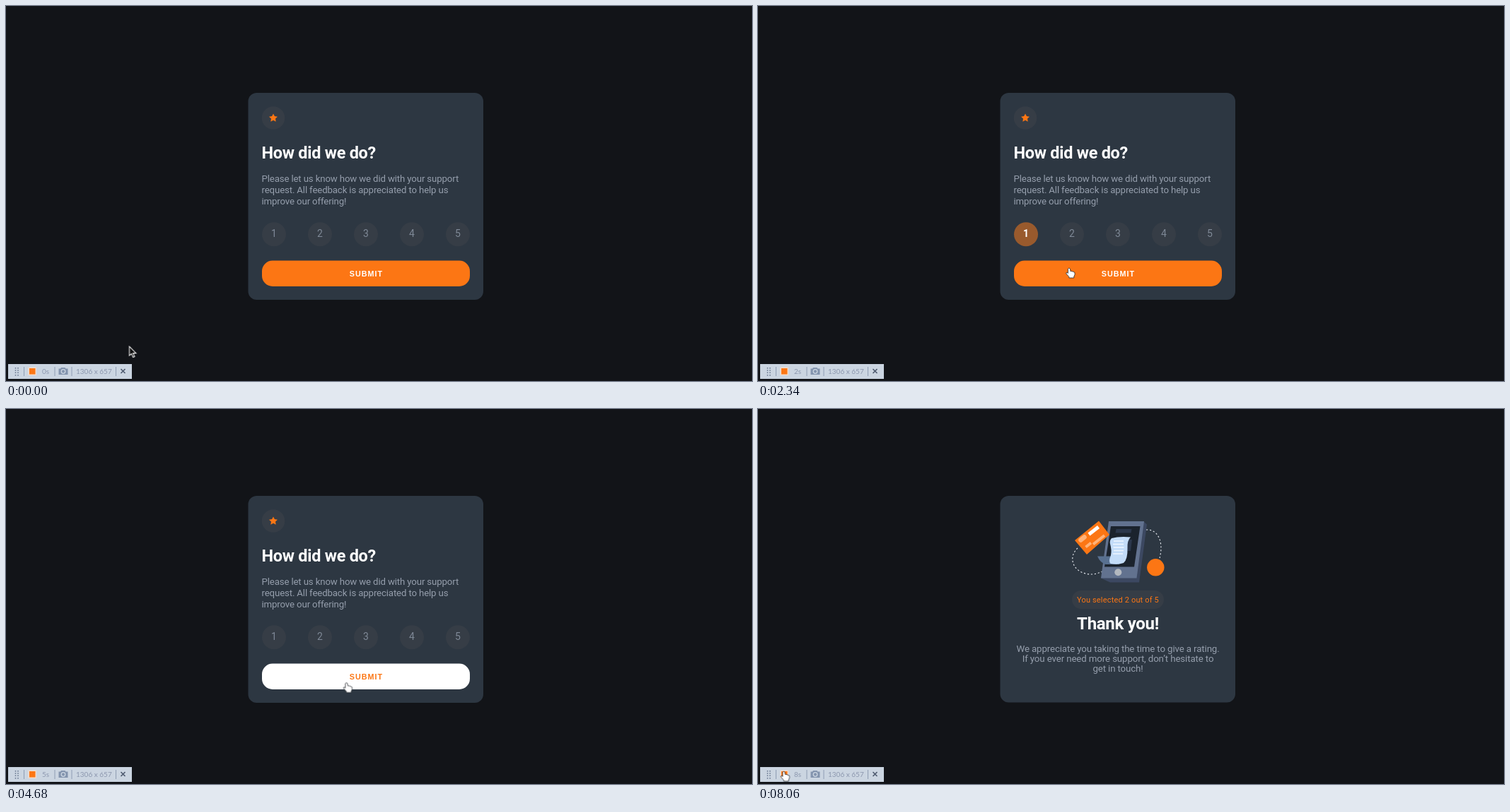
An HTML page that plays this animation: 1055x531 px, repeating every 8.19 s.

```html
<!DOCTYPE html>
<html lang="en">
<head>
<meta charset="utf-8">
<title>Rating card</title>
<style>
  html, body { margin: 0; width: 100%; height: 100%; overflow: hidden; background: #121418; }
  svg { display: block; width: 100%; height: 100%; }
  text { font-family: Roboto, sans-serif; }
  .title { font-size: 23.5px; font-weight: 700; letter-spacing: -.3px; fill: #fff; }
  .body { font-size: 13.3px; letter-spacing: -.17px; fill: #959eac; }
  .mid { text-anchor: middle; }
  .disc { fill: #363d46; }
  .digit { font-size: 14px; fill: #7f8997; }
  .orange { fill: #fc7614; }
  .submit { font: 700 10.8px "Liberation Sans", Arial, sans-serif; letter-spacing: .95px; fill: #fff; }
  .bar text { font: 10px Lato, sans-serif; fill: #8c97ae; }
  .sep { stroke: #8f9db3; }
</style>
</head>
<body>
<svg viewBox="0 0 1055 531">
  <g id="form">
    <rect x="342.5" y="123" width="332.5" height="293" rx="12" fill="#2d3742"/>
    <circle class="disc" cx="378" cy="158.5" r="16.3"/>
    <path id="star" class="orange" d="M378 152.4l1.9 3.7 4.1.6-3 2.9.7 4.2-3.7-2-3.7 2 .7-4.2-3-2.9 4.1-.6z"/>
    <text class="title" x="361.5" y="216">How did we do?</text>
    <g class="body">
      <text x="361.5" y="249">Please let us know how we did with your support</text>
      <text x="361.5" y="265">request. All feedback is appreciated to help us</text>
      <text x="361.5" y="281.2">improve our offering!</text>
    </g>
    <g id="ratings"></g>
    <rect id="button" class="orange" x="362" y="360.5" width="294" height="36.5" rx="15"/>
    <text id="label" class="submit mid" x="509.4" y="382.6">SUBMIT</text>
  </g>

  <g id="thanks" opacity="0">
    <rect x="342.5" y="123" width="332.5" height="292.4" rx="12" fill="#2d3742"/>
    <g fill="none" stroke="#e4e8ee" stroke-width="1.1" stroke-dasharray="2.2 2.8">
      <path d="M549 171C566 170 574 189 568 211"/>
      <path d="M452 197C439 209 444 228 463 233Q475 236 487 230"/>
    </g>
    <path d="M545 159l5 4.5L539 245.500H498L485 239.500z" fill="#3c4861"/>
    <path d="M496 159H546L535.500 239.500H485z" fill="#62728f"/>
    <path d="M499 166H540.500L532 223.500H490z" fill="#1b232d"/>
    <path d="M506.500 170H528.500L527.500 175.500H505.500z" fill="#2b374b"/>
    <path d="M521 184l8 1-2 16h-6z" fill="#2b374b"/>
    <path d="M480 208.500H512L511 220H492Q484 218 480 208.500z" fill="#587090"/>
    <path d="M500 183Q511 180 527 181.500 522 186 522.500 197 523 213 517 218 509 221 499 219 495 217 499 207 500.500 200 498 191 497 186 500 183z" fill="#c3dcf8"/>
    <path d="M503 187h14M502 191.500h15M502.500 196h15M503 200.500h14M502 205h14" stroke="#eff6ff" stroke-width="1.3"/>
    <circle cx="509.300" cy="231.300" r="5" fill="#b3b8bf"/>
    <path class="orange" d="M448 186L482 158.500 497 178 465 206z"/>
    <path d="M468 177.500L481.500 167" stroke="#fff" stroke-width="5"/>
    <g stroke="#ffb278" stroke-width="4">
      <path d="M463.500 195.500l7.500-6M474 191.500l16-12.500"/>
      <path d="M456.500 185.500l5-4" stroke-width="6.500" stroke-linecap="round"/>
    </g>
    <circle class="orange" cx="562.300" cy="224.300" r="12.200"/>
    <rect class="disc" x="444" y="257" width="130" height="26" rx="13"/>
    <text class="orange mid" x="509" y="274.400" font-size="11" letter-spacing=".17">You selected 2 out of 5</text>
    <text class="title mid" x="509" y="312" style="font-size:24px">Thank you!</text>
    <g class="body mid" style="letter-spacing:-.13px">
      <text x="509" y="343.600">We appreciate you taking the time to give a rating.</text>
      <text x="509" y="357.700">If you ever need more support, don’t hesitate to</text>
      <text x="509" y="371.800">get in touch!</text>
    </g>
  </g>

  <g class="bar">
    <rect id="strip" x="3" y="507" width="175" height="21" fill="#cbd5e1"/>
    <path d="M13.500 512v12M17 512v12" stroke="#63718a" stroke-width="1.500" stroke-dasharray="1.500 1.800"/>
    <path class="sep" d="M25.500 511v13"/>
    <rect x="31.500" y="511.500" width="11.500" height="11.500" fill="#f3dccb"/>
    <rect id="stop" class="orange" x="33" y="513" width="8.500" height="8.500"/>
    <text id="seconds" x="51" y="520.500">0s</text>
    <g id="tail">
      <path class="sep" d="M69 511v13M93 511v13M155.500 511v13"/>
      <path d="M74.500 513.500h2.500l1-1.500h5.500l1 1.500h3v8.500h-13z" fill="#8394ae"/>
      <circle cx="81" cy="517.500" r="2.800" fill="none" stroke="#cbd5e1" stroke-width="1.300"/>
      <text x="99" y="520.500">1306 x 657</text>
      <path d="M162.500 514l6 6m0-6l-6 6" stroke="#4d596e" stroke-width="1.600"/>
    </g>
  </g>

  <g id="cursor">
    <path id="arrow" d="M0 0V13L3 10.400 5.200 15.400 7.400 14.400 5.200 9.600H9.400z" fill="#111" stroke="#f2f2f2" stroke-width="1.100"/>
    <path id="hand" d="M-1.600 1.200Q0-1 1.400 1L2 4.600 3.400 4.400 4.600 5 6 5 6.600 5.800Q8.200 5.600 8 7.500V9.500L6.800 12V14H-.2V12.400L-4.200 8Q-4.600 6-2.600 6.600L-1.600 7.500z" fill="#fff" stroke="#23262b" stroke-width=".8"/>
  </g>
</svg>
<script>
const LOOP = 8190, STEP = 130;
const ORANGE = '#fc7614', GREY = '#363d46', DIGIT = '#7f8997', WHITE = '#ffffff';
const $ = id => document.getElementById(id);
const tracks = [];

// keys: alternating time in ms and value; the last value holds to the end
function track(el, prop, keys, easing = 'linear') {
  const frames = [];
  for (let i = 0; i < keys.length; i += 2)
    frames.push({ offset: keys[i] / LOOP, [prop]: keys[i + 1], easing });
  frames.push({ offset: 1, [prop]: keys[keys.length - 1] });
  const anim = el.animate(frames, { duration: LOOP, fill: 'both' });
  anim.pause();
  tracks.push(anim);
}
const jump = (el, prop, ...keys) => track(el, prop, keys, 'step-end');
const fade = (el, ...keys) => track(el, 'fill', keys);

const ratings = [1, 2, 3, 4, 5].map(n => {
  const x = 379 + (n - 1) * 65;
  $('ratings').insertAdjacentHTML('beforeend',
    `<g><circle class="disc" cx="${x}" cy="323.200" r="17"/><text class="digit mid" x="${x}" y="327.300">${n}</text></g>`);
  return $('ratings').lastChild.children;
});

function highlight([disc, digit], ...spans) {
  const fills = [0, GREY], colours = [0, DIGIT], weights = [0, 400];
  for (const [from, full, leave, end] of spans) {
    fills.push(from, GREY, full, ORANGE, leave, ORANGE, end, GREY);
    colours.push(from + STEP, WHITE, end, DIGIT);
    weights.push(from + STEP, 700, end, 400);
  }
  fade(disc, ...fills);
  jump(digit, 'fill', ...colours);
  jump(digit, 'fontWeight', ...weights);
}
highlight(ratings[0], [260, 520, 780, 1040], [1820, 2080, 2210, 2470]);
highlight(ratings[1], [2990, 3250, 3770, 4110]);

fade($('button'), 0, ORANGE, 780, ORANGE, 1170, WHITE, 1690, WHITE, 1820, '#fde6d4', 2210, ORANGE,
  2340, ORANGE, 2730, '#fff4ec', 2860, '#fff4ec', 2990, '#fdd6ba', 3250, ORANGE,
  3770, ORANGE, 3900, '#ff954d', 4160, WHITE);
fade($('label'), 0, WHITE, 780, WHITE, 1170, ORANGE, 1690, ORANGE, 1820, '#a9714a', 2210, WHITE,
  2340, WHITE, 2730, ORANGE, 2860, ORANGE, 2990, '#fb9d59', 3250, WHITE,
  3770, WHITE, 3900, '#d9c6b8', 4160, ORANGE);
fade($('star'), 0, ORANGE, 1690, ORANGE, 1820, '#c07c4c', 1950, ORANGE,
  2860, ORANGE, 2990, '#fca165', 3120, ORANGE);
jump($('stop'), 'fill', 0, ORANGE, 1170, '#000', 2080, ORANGE, 2730, '#000', 3120, ORANGE,
  4160, '#000', 4680, ORANGE);
jump($('form'), 'opacity', 0, 1, 5200, 0);
jump($('thanks'), 'opacity', 0, 0, 5200, 1);

const path = [
  [0, 174.500, 482], [130, 215, 450], [390, 372, 330], [520, 379, 326], [780, 433.500, 363.500],
  [910, 468, 380], [1560, 466, 379], [1820, 393, 332], [1950, 381, 325], [2080, 385, 328],
  [2340, 440, 371], [2600, 472, 378], [2730, 472, 372], [2990, 452.500, 335.500], [3120, 445, 326],
  [3640, 452, 340], [3900, 481.500, 387.500], [6630, 481.500, 387.500], [6890, 430, 405],
  [7150, 300, 445], [7410, 150, 487], [7540, 70, 507], [7670, 42, 514], [8060, 36.500, 513]
];
path.splice(6, 0, [1430, 468, 380]);
path.splice(16, 0, [3510, 445, 326]);
track($('cursor'), 'transform', path.flatMap(([t, x, y]) => [t, `translate(${x}px, ${y}px)`]));

const handShown = [0, 0, 390, 1, 1820, 0, 1950, 1, 2990, 0, 3120, 1, 6760, 0, 7800, 1];
jump($('hand'), 'opacity', ...handShown);
jump($('arrow'), 'opacity', ...handShown.map((v, i) => i % 2 ? 1 - v : v));

function draw(now) {
  const t = Math.floor(now % LOOP / STEP) * STEP;
  for (const anim of tracks) anim.currentTime = t;
  const seconds = Math.floor((t + 520) / 1040), narrow = seconds === 1;
  $('seconds').textContent = seconds + 's';
  $('strip').setAttribute('width', narrow ? 172 : 175);
  $('tail').setAttribute('transform', `translate(${narrow ? -2.300 : 0})`);
}

const start = performance.now();
function tick() {
  draw(performance.now() - start);
  requestAnimationFrame(tick);
}
tick();
</script>
</body>
</html>
```
